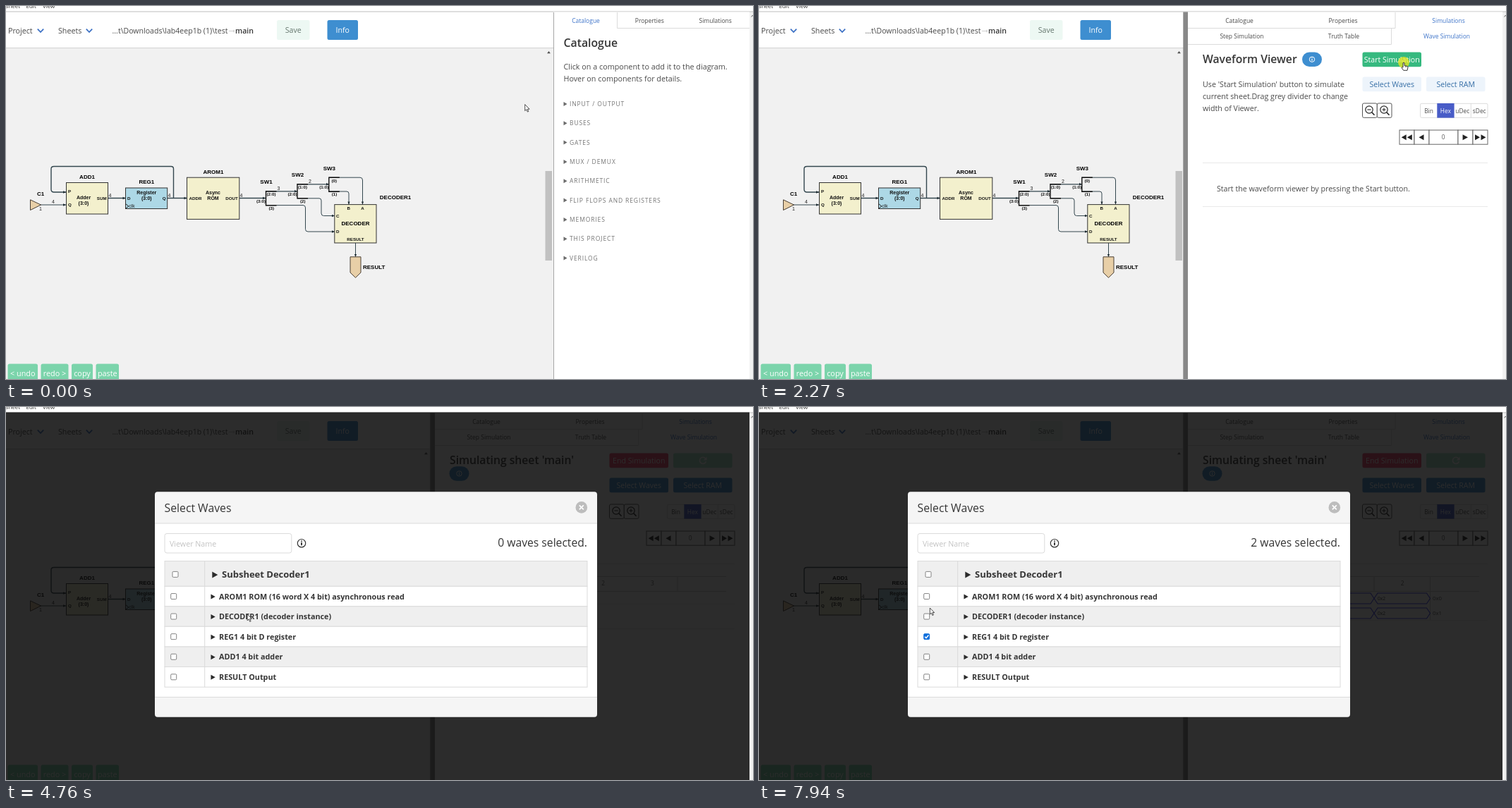
An HTML page that plays this animation: 1059 px wide and 529 px high, repeating every 8 s.

```html
<!DOCTYPE html>
<html lang="en">
<head>
<meta charset="utf-8">
<title>Waveform simulation</title>
<style>
html, body { margin: 0; width: 100%; height: 100%; overflow: hidden; background: #fff; }
svg { display: block; width: 1059px; height: 529px; font-family: "Open Sans", "Noto Sans", sans-serif; }
text { white-space: pre; }
.dia { font-family: "Liberation Sans", Arial, sans-serif; font-weight: 700; }
.off { display: none; }
</style>
</head>
<body>
<svg id="stage" viewBox="0 0 1059 529" xmlns="http://www.w3.org/2000/svg"></svg>
<script>
const MID = 'text-anchor="middle"', END = 'text-anchor="end"';
const INK = '#4a4a4a', DARK = '#363636', BLUE = '#3e8ed0', EDGE = '#dbdbdb';

const text = (x, y, s, size = 10.7, fill = INK, extra = '') =>
  `<text x="${x}" y="${y}" font-size="${size}" fill="${fill}" ${extra}>${s}</text>`;
const mid = (x, y, s, size, fill, extra = '') => text(x, y, s, size, fill, MID + ' ' + extra);
const box = (x, y, x2, y2, fill, extra = '') =>
  `<rect x="${x}" y="${y}" width="${x2 - x}" height="${y2 - y}" fill="${fill}" ${extra}/>`;
const path = (d, stroke = EDGE, w = 1, fill = 'none') =>
  `<path d="${d}" fill="${fill}" stroke="${stroke}" stroke-width="${w}"/>`;
const shape = (d, fill) => `<path d="${d}" fill="${fill}"/>`;
const group = (id, s, extra = '') => `<g id="${id}" ${extra}>${s}</g>`;
const button = (x, y, x2, y2, fill, label, color = '#fff', extra = '') =>
  box(x, y, x2, y2, fill, 'rx="2.5" ' + extra) +
  mid((x + x2) / 2, (y + y2) / 2 + 3.9, label, 10.6, color);
const play = (x, y, w, h, dir = 1, fill = '#222') =>
  shape(`M${x - dir * w / 2} ${y - h / 2}L${x + dir * w / 2} ${y}L${x - dir * w / 2} ${y + h / 2}z`, fill);

function navbar() {
  const chevron = x => path(`M${x - 4.2} 32.6L${x} 37L${x + 4.2} 32.6`, '#3a6fc4', 1.7);
  return box(0, 0, 1059, 529, '#fff') +
    text(-1, 3.4, 'Sheet', 8, '#333') + text(28.5, 3.4, 'Edit', 8, '#333') + text(52, 3.4, 'View', 8, '#333') +
    box(1054, 8, 1059, 529, '#f1f1f1') + path('M1056.5 15.5L1058.5 13L1060 15.5', '#666') +
    path('M0 8H1059', '#bdbdbd', 1.2) +
    text(3, 38.5, 'Project') + chevron(49) + text(74, 38.5, 'Sheets') + chevron(118) +
    text(150.5, 38.5, '...t\\Downloads\\lab4eep1b (1)\\test', 10.55) +
    path('M316 35.5H324M321.8 33.8L324 35.5L321.8 37.2', '#c4c4c4', .8) +
    text(325, 38.5, 'main', 10.6, DARK, 'font-weight="600"') +
    button(384, 20, 430.5, 48, '#edf8f3', 'Save', '#65776e') +
    button(455.5, 20, 499, 48, BLUE, 'Info') +
    box(0, 60, 777, 529, '#f1f1f1') + path('M0 59.5H777', '#d2d2d2');
}

function diagram() {
  const wire = (d, w = 1) => path(d, '#34474f', w);
  const head = (x, y) => play(x - 2, y, 4, 3.4, 1, '#1c2a30');
  const down = (x, y) => shape(`M${x - 1.6} ${y - 4}h3.2L${x} ${y}z`, '#1c2a30');
  const part = (x, y, x2, y2, fill) => box(x, y, x2, y2, fill, 'stroke="#333" stroke-width="1"');
  const name = (x, y, s) => mid(x, y, s, 8, '#000');
  const body = (x, y, s) => mid(x, y, s, 7, '#111');
  const port = (x, y, s, extra = '') => text(x, y, s, 6.2, '#111', extra);
  const split = (x, y, n, inn, top, low) =>
    path(`M${x + 15} ${y}H${x}V${y + 20}H${x + 15}`, '#111', 1.4) + name(x + .5, y - 10.5, n) +
    mid(x - 7, y + 16, inn, 6.2, '#111') + mid(x + 7.5, y + 6.3, top, 6.2, '#111') +
    mid(x + 7.8, y + 26, low, 6.2, '#111');
  const cream = '#f3f0cd', tan = '#e8cfa7';
  return wire('M49 282H85') + wire('M144.5 272.5H169.5M229 272.5H256.5M331 272.5H368', 1.4) +
    wire('M237.5 272.5V231Q237.5 227.5 234 227.5H68Q64 227.5 64 231V260Q64 264 68 264H85', 1.4) +
    wire('M368 262.8H413M413 252.8H458', 1.3) +
    wire('M368 282.6H421Q424.5 282.6 424.5 286V316.5Q424.5 320 428 320H466') +
    wire('M413 272.8H444Q447 272.8 447 276V294Q447 297.5 450.5 297.5H466') +
    wire('M458 243.2H502Q505.5 243.2 505.5 247V281.5M458 263H483Q486 263 486 266V281.5M495.5 336V356') +
    head(85, 282) + head(85, 264) + head(169.5, 272.5) + head(256.5, 272.5) + head(368, 272.5) +
    head(413, 262.8) + head(458, 252.8) + head(466, 320) + head(466, 297.5) +
    down(505.5, 281.5) + down(486, 281.5) + down(495.5, 356) +
    path('M34.5 274.8L49.5 282L34.5 289.5z', '#4a4036', 1, tan) + name(49, 269, 'C1') +
    text(47, 290, '1', 7, '#222', 'font-weight="400"') +
    part(85.5, 250.5, 144.5, 295, cream) + name(115, 245, 'ADD1') + body(110, 274, 'Adder') + body(110, 282.2, '(3:0)') +
    port(88, 265.3, 'P') + port(88, 283.6, 'Q') + port(142.6, 274.6, 'SUM', END) +
    part(169.5, 258, 228.7, 287.5, '#add8e6') + name(199.3, 252, 'REG1') + body(199.3, 266.7, 'Register') +
    body(199.3, 274.5, '(3:0)') + port(172, 274.6, 'D') + port(221.7, 274.6, 'Q') +
    path('M169.8 280.8L174 284L169.8 287', '#222') + text(174.5, 286, 'clk', 6.6, '#222', 'font-weight="400"') +
    part(256.5, 243.2, 330.8, 302.4, cream) + name(294, 237.8, 'AROM1') + body(293.5, 266.7, 'Async') +
    body(293.5, 275, 'ROM') + port(259.5, 274.6, 'ADDR') + port(328.8, 274.6, 'DOUT', END) +
    [[65, 280.3, 4], [145.5, 271, 4], [229.6, 271, 4], [331.6, 271, 4], [384.5, 261, 3], [429, 251.3, 2]]
      .map(([x, y, s]) => text(x, y, s, 7, '#222', 'font-weight="400"')).join('') +
    split(368.5, 262.8, 'SW1', '(3:0)', '(2:0)', '(3)') +
    split(413, 252.8, 'SW2', '(2:0)', '(1:0)', '(2)') +
    split(457.8, 243.2, 'SW3', '(1:0)', '(0)', '(1)') +
    part(465.8, 281.6, 525, 336, cream) + name(552, 274, 'DECODER1') + name(495.5, 311, 'DECODER') +
    port(483.5, 289, 'B') + port(503.2, 289, 'A') + port(468, 299.5, 'C') + port(468, 322, 'D') +
    port(495.5, 333.4, 'RESULT', MID) +
    path('M488 355.8H503V378L495.5 385.3L488 378z', '#4a4036', 1, tan) + text(506, 372.5, 'RESULT', 8, '#000');
}

const editButtons = () =>
  [[2.5, 45, '&lt; undo'], [49.5, 88.5, 'redo &gt;'], [93, 123, 'copy'], [127.5, 160, 'paste']]
    .map(([x, x2, s]) => box(x, 507.5, x2, 535, '#7bd4ab', 'rx="2.5"') + mid((x + x2) / 2, 525.3, s, 10.8, '#fff')).join('');

const scrollbar = x => box(x, 60, x + 11, 529, '#f1f1f1') + box(x, 234, x + 9.5, 361, '#c1c1c1') +
  shape(`M${x + 2.6} 67.3L${x + 5} 64L${x + 7.4} 67.3z`, '#505050');

const tabs = (y, list, active) => list.map(([x, s], i) => mid(x, y, s, 8.5, i === active ? '#3e74c9' : INK)).join('');

function catalogue() {
  const items = ['INPUT / OUTPUT', 'BUSES', 'GATES', 'MUX / DEMUX', 'ARITHMETIC',
    'FLIP FLOPS AND REGISTERS', 'MEMORIES', 'THIS PROJECT', 'VERILOG'];
  return scrollbar(764.5) + box(776, 8.5, 1054, 529, '#fff') + path('M776.5 9V529', '#a6a6a6') +
    group('tabHover', box(958, 9, 1054, 31, '#f4f4f4')) +
    path('M866.5 9V31.5H1054') +
    tabs(23.5, [[822, 'Catalogue'], [912.3, 'Properties'], [1005.7, 'Simulations']], 0) +
    text(790.5, 57.8, 'Catalogue', 15.8, DARK, 'font-weight="600"') +
    text(790.5, 90.4, 'Click on a component to add it to the diagram.', 10.78) +
    text(790.5, 107.2, 'Hover on components for details.', 10.78) +
    items.map((s, i) => play(793, 138.9 + i * 27.34, 5, 6, 1, '#6a6a6a') +
      text(799, 142 + i * 27.34, s, 8.5, '#747474', 'letter-spacing=".88"')).join('');
}

const infoBadge = (x, y) => box(x, y, x + 28, y + 20.5, BLUE, 'rx="10.2"') +
  `<circle cx="${x + 14}" cy="${y + 10.2}" r="3.7" fill="none" stroke="#fff"/>` +
  path(`M${x + 14} ${y + 9.6}v2.6M${x + 14} ${y + 7.8}v1`, '#fff', 1.2);

function viewer() {
  const lens = (x, sign) => `<circle cx="${x}" cy="147" r="5.2" fill="none" stroke="#222" stroke-width="1.2"/>` +
    path(`M${x + 3.8} 150.8L${x + 7.5} 154.8`, '#222', 1.6) + path(`M${x - 2.6} 147h5.2${sign}`, '#222', 1.1);
  const line = y => path(`M629 ${y}H1033`, '#e9e9e9');
  const para = (x, y, lines) => lines.map((s, i) => text(x, y + i * 16.8, s, 10.7)).join('');
  const title = s => text(629, 80.8, s, 15.7, DARK, 'font-weight="600"');
  const radix = ['Bin', 'Hex', 'uDec', 'sDec'];
  const cells = [908, 929, 950, 991, 1012, 1033];
  const idle = title('Waveform Viewer') + infoBadge(770, 65.5) +
    button(855.5, 65.5, 939, 86.3, '#48c78e', 'Start Simulation', '#fff', 'id="start"') +
    button(855.5, 100.5, 939, 121.3, '#edf4fb', 'Select Waves', '#376fa6') +
    button(946, 100.5, 1029.5, 121.3, '#edf4fb', 'Select RAM', '#376fa6') +
    para(629, 115.2, ["Use 'Start Simulation' button to simulate", 'current sheet.Drag grey divider to change', 'width of Viewer.']) +
    text(649, 263, 'Start the waveform viewer by pressing the Start button.', 10.65) + line(284.5);
  const header = path('M629 240.5H1021M629 261.5H1021', '#cfcfcf');
  const plain = box(672, 241, 741.5, 261, '#f3f3f3') + header + path('M671.5 240V262M741.5 240V262M952 240V262', '#cfcfcf') +
    [0, 1, 2, 3].map(i => mid(706.7 + i * 69.9, 253.4, i, 8.3, '#5a5a5a')).join('') + line(279.5) + line(314.5);
  const cell = (x, x2, y) => path(`M${x} ${y + 7.5}L${x + 5} ${y}H${x2 - 5}L${x2} ${y + 7.5}L${x2 - 5} ${y + 15}H${x + 5}z`, '#3a3af0', 1.1);
  const waves = header + path('M872 240V262M951.5 240V302', '#cfcfcf') + mid(912, 253.4, 2, 8.3, '#5a5a5a') + line(302.5) +
    [264, 285].map((y, i) => cell(792, 872, y) + cell(872, 951.5, y) +
      text(877, y + 10, '0x2', 6.6, '#333') + text(955, y + 10.2, '0x' + i, 7.8, '#555')).join('');
  const sim = title("Simulating sheet 'main'") + infoBadge(628.5, 84.2) +
    button(855.5, 65.5, 939, 86.3, '#f2416a', 'End Simulation') +
    box(946, 65.5, 1029.5, 86.3, '#a3e3c6', 'rx="2.5"') +
    path('M991.8 73.2A4.6 4.6 0 1 0 992.4 77.3', '#fff', 1.7) + shape('M993.6 70.6V75.6H988.6z', '#fff') +
    button(855.5, 100.5, 939, 121.3, BLUE, 'Select Waves', '#fff', 'id="pick"') +
    button(946, 100.5, 1029.5, 121.3, BLUE, 'Select RAM') +
    group('help', para(629, 134.6, ['View clocked logic waveforms by', 'selecting waves. Select RAMs or ROMs to',
      'view contents during the simulation. View', 'or change any sheet with simulation',
      'running. After design changes use ⟳ to']), 'clip-path="url(#crop)"') +
    group('plain', plain) + group('waves', waves);
  return scrollbar(590.5) + box(601.3, 8.5, 608, 529, '#888') + box(608, 8.5, 1054, 529, '#fff') +
    path('M608 31.5H902V9M608 54.5H896.5V32') +
    tabs(23.5, [[681, 'Catalogue'], [828, 'Properties'], [977.5, 'Simulations']], 2) +
    tabs(46.3, [[684.5, 'Step Simulation'], [829, 'Truth Table'], [975, 'Wave Simulation']], 2) +
    box(855.5, 138, 876.3, 158.3, '#fff', 'rx="2" stroke="#555"') + box(876.3, 138, 897, 158.3, '#fff', 'rx="2" stroke="#555"') +
    lens(865, '') + lens(886, 'M886 144.4v5.2') +
    box(937.5, 138.3, 1033, 158.3, '#fff', `rx="2" stroke="${EDGE}"`) + path('M1009.3 138V158') +
    box(961.3, 138, 985.6, 158.6, '#485cc7') +
    radix.map((s, i) => mid(949.5 + i * 23.9, 151.6, s, 8.4, i === 1 ? '#fff' : INK)).join('') +
    cells.slice(0, 5).map((x, i) => box(x, 176, cells[i + 1], 196.2, '#fff', 'stroke="#666"')).join('') +
    play(914.2, 186.3, 7, 8, -1) + play(922.3, 186.3, 7, 8, -1) + play(939, 186.3, 7, 8, -1) + mid(970, 189.3, 0, 8.3, '#555') +
    play(1001.3, 186.3, 7.5, 8) + play(1018.5, 186.3, 7, 8) + play(1027, 186.3, 7, 8) +
    line(222.5) + group('idle', idle) + group('sim', sim);
}

function modal() {
  const rows = [['Subsheet Decoder1', 218.5, 254.3], ['AROM1 ROM (16 word X 4 bit) asynchronous read', 254.3, 282.8],
    ['DECODER1 (decoder instance)', 282.8, 311.3], ['REG1 4 bit D register', 311.3, 340],
    ['ADD1 4 bit adder', 340, 368.5], ['RESULT Output', 368.5, 397.2]];
  const row = ([s, y, y2], i) => {
    const big = i === 0, c = (y + y2) / 2 + (big ? 1 : 0), cx = big ? 240 : 237.7;
    return box(225, y, 824, y2, i % 2 ? '#fff' : '#efefef', `stroke="${EDGE}"`) +
      box(cx - 4, c - 4, cx + 4, c + 4, '#fff', `rx="1.3" stroke="#767676" stroke-width=".9" ${i === 3 ? 'id="check"' : ''}`) +
      play(big ? 296.3 : 293.6, c + .5, big ? 8 : 6.3, big ? 9 : 7, 1, '#2b2b2b') +
      text(big ? 306 : 302, c + (big ? 4.6 : 4.2), s, big ? 13 : 10.8, DARK, 'font-weight="700"');
  };
  return box(0, 7.5, 1054, 529, '#0a0a0a', 'opacity=".86"') +
    box(211, 120.3, 838, 439.7, '#f5f5f5', 'rx="4"') + box(211, 165, 838, 411.5, '#fff') +
    path('M211 165H838M211 411.5H838') +
    text(224.5, 148.7, 'Select Waves', 15.8, DARK) +
    '<circle cx="815.8" cy="142.4" r="8.3" fill="#bdbdbd"/>' + path('M812.8 139.4l6 6M818.8 139.4l-6 6', '#fff', 1.7) +
    box(225, 179.5, 404.8, 207, '#fff', `rx="3" stroke="${EDGE}"`) + text(232, 197.7, 'Viewer Name', 10.7, '#c3c3c3') +
    '<circle cx="419" cy="193.2" r="5.7" fill="none" stroke="#333" stroke-width="1.2"/>' +
    path('M419 192v4.3M419 189.6v1.5', '#222', 1.7) +
    text(824, 198.2, '0 waves selected.', 15.7, DARK, END + ' id="count"') +
    rows.map(row).join('') + path('M281.7 218.5V397.2') +
    group('tick', path('M235.2 325.8L237 327.7L240.4 323.6', '#fff', 1.5));
}

const cursor = () => group('cursor',
  '<circle id="glow" r="8" fill="#f2ea1c" opacity=".72"/>' +
  group('arrow', path('M0 0V9L2.1 7.1L3.6 10.5L5.1 9.9L3.6 6.6H6.4z', '#222', .8, '#fff')) +
  group('hand', path('M-1 .8Q0 -.6 1 .8V4.6L5 5.3Q6 5.6 6 6.8L5 11.3H-.3L-3 7.6Q-3 6.2 -1 7z', '#222', .9, '#fff') +
    path('M2.4 5v2M3.9 5.3v1.8', '#444', .6)));

const stage = document.getElementById('stage');
stage.innerHTML = '<defs><clipPath id="crop"><rect x="620" y="120" width="230" height="76.5"/></clipPath></defs>' +
  navbar() + group('diagram', diagram(), 'class="dia"') + editButtons() +
  group('catalogue', catalogue()) + group('viewer', viewer()) + group('modal', modal()) + cursor();

const el = {};
stage.querySelectorAll('[id]').forEach(n => el[n.id] = n);
const show = (id, on) => el[id].classList.toggle('off', !on);

// Pointer moves: start, end, x, y
const moves = [[470, 1230, 1010.5, 19.5], [1330, 1990, 914, 80], [2870, 3270, 907.5, 110.5],
  [3810, 4010, 582, 276], [4160, 4350, 381, 282], [4490, 5270, 236.5, 326],
  [6800, 7060, 284, 325.5], [7270, 7930, 242.3, 285]];

function pointer(t) {
  let x = 735.7, y = 139.6;
  for (const [a, b, px, py] of moves) {
    const u = Math.min(1, Math.max(0, (t - a) / (b - a))), k = (1 - Math.cos(Math.PI * u)) / 2;
    x += (px - x) * k;
    y += (py - y) * k;
  }
  return [x, y];
}

const within = (t, a, b) => t >= a && t < b;

function draw(t) {
  const [x, y] = pointer(t);
  const wave = t >= 1370, sim = t >= 2340, open = t >= 3540, done = t >= 5980;
  const over = (x1, y1, x2, y2) => x > x1 && x < x2 && y > y1 && y < y2;
  const onTab = over(wave ? 608 : 777, 9, 1054, wave ? 54 : 31);
  const onTop = over(855, 65, 939, 87), onPick = over(855, 100, 939, 122), onCheck = over(233, 320, 242, 330);
  const hand = open ? onCheck : onTab || wave && (onTop || sim && onPick);

  show('catalogue', !wave);
  show('viewer', wave);
  show('tabHover', over(958, 9, 1054, 31));
  show('idle', !sim);
  show('sim', sim);
  show('plain', !done);
  show('waves', done);
  show('modal', open);
  show('tick', done);
  el.start.setAttribute('fill', onTop ? '#36b97f' : '#48c78e');
  el.pick.setAttribute('fill', onPick ? '#3080c2' : BLUE);
  el.count.textContent = (done ? 2 : 0) + ' waves selected.';
  el.check.setAttribute('fill', done ? '#0f6fdc' : '#fff');
  el.check.setAttribute('stroke', done ? '#0f6fdc' : t >= 5380 && onCheck ? '#4f4f4f' : '#767676');

  el.cursor.setAttribute('transform', `translate(${x.toFixed(2)} ${y.toFixed(2)})`);
  show('hand', hand);
  show('arrow', !hand);
  show('glow', within(t, 1290, 1370) || within(t, 2220, 2340) || within(t, 3330, 3540) || within(t, 5710, 5850));
}

const begin = performance.now();
function tick() {
  draw((performance.now() - begin) % 8000);
  requestAnimationFrame(tick);
}
draw(0);
requestAnimationFrame(tick);
</script>
</body>
</html>
```
